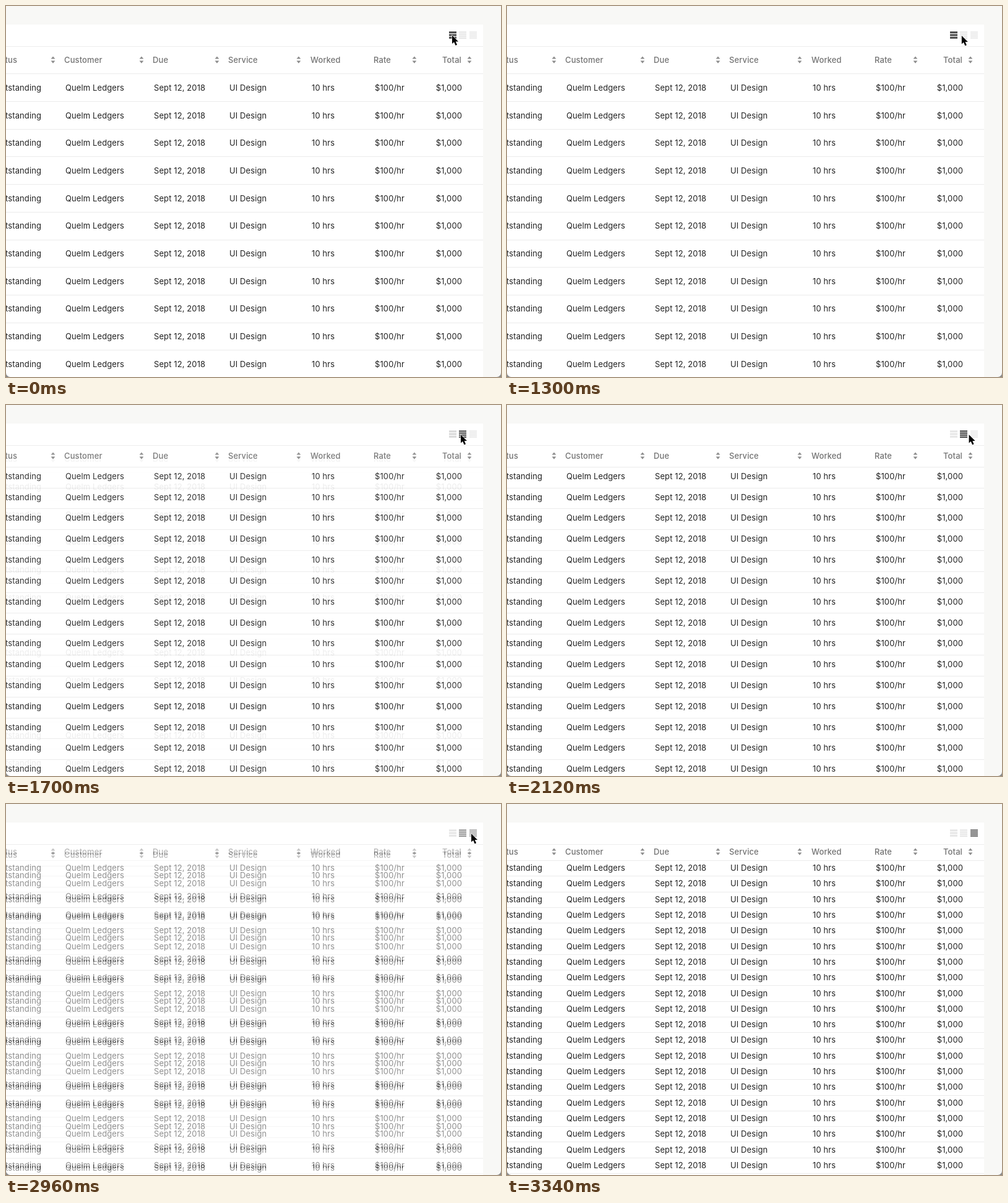
Recreate the animation shown at these times as an HTML page. Size 800 px wide and 600 px high, loop 3.6 s.

```html
<!DOCTYPE html>
<html lang="en">
<head>
<meta charset="utf-8">
<title>Table density</title>
<style>
  html, body { margin: 0; width: 100%; height: 100%; overflow: hidden; background: #f8f8f6; }
  svg { display: block; width: 800px; height: 600px; }
  text { font: 400 13px Inter, sans-serif; letter-spacing: .1px; fill: #222; }
  .head { font-weight: 500; fill: #737373; }
</style>
</head>
<body>
<svg id="stage" viewBox="0 0 800 600"></svg>
<script>
const LOOP = 3600;
const stage = document.getElementById('stage');

function add(parent, tag, attrs, label) {
  const el = document.createElementNS('http://www.w3.org/2000/svg', tag);
  for (const key in attrs) el.setAttribute(key, attrs[key]);
  if (label) el.textContent = label;
  parent.appendChild(el);
  return el;
}

const rect = (parent, x, y, width, height, fill) =>
  add(parent, 'rect', { x, y, width, height, fill });

// title, title x, cell, cell x, anchor, sort arrow x
const columns = [
  ['Status', 18, 'Outstanding', 57, 'end', 76],
  ['Customer', 94, 'Quelm Ledgers', 96, 'start', 219],
  ['Due', 237, 'Sept 12, 2018', 239, 'start', 341],
  ['Service', 359, 'UI Design', 361, 'start', 473],
  ['Worked', 492, '10 hrs', 494, 'start', 0],
  ['Rate', 594, '$100/hr', 596, 'start', 660],
  ['Total', 736, '$1,000', 737, 'end', 749]
];

// head: title centre, line: first rule, row: first cell centre, step: row height
const views = [
  { head: 87, line: 109.3, row: 131.8, step: 44.7 },
  { head: 82, line: 99.7, row: 114.8, step: 33.82 },
  { head: 77, line: 91, row: 103.1, step: 25.3 }
];

// x, bar count, bar height, bar pitch
const icons = [
  [716, 3, 3, 4.3],
  [732, 4, 2.2, 3.2],
  [749, 6, 1.2, 2.1]
];

function drawIcons(layer, active) {
  icons.forEach(([x, count, height, pitch], i) => {
    const fill = i === active ? '#484848' : '#e6e6e6';
    for (let k = 0; k < count; k++) rect(layer, x, 41.2 + k * pitch, 12, height, fill);
  });
}

function drawView(view, index) {
  const layer = add(stage, 'g', {});
  rect(layer, 0, 30, 771, 570, '#fff');
  rect(layer, 0, 65, 771, 1, '#ededed');
  drawIcons(layer, index);

  for (const [title, x, , , anchor, sort] of columns) {
    add(layer, 'text', { x, y: view.head + 5, 'text-anchor': anchor, class: 'head' }, title);
    if (sort) {
      add(layer, 'path', {
        d: `M${sort - 3.4} ${view.head - 1.4}h6.8l-3.4-4.2zm0 3h6.8l-3.4 4.2z`,
        fill: '#8c8c8c'
      });
    }
  }

  for (let k = 0; view.line + k * view.step < 600; k++) {
    rect(layer, 0, Math.round(view.line + k * view.step), 771, 1, '#ebebeb');
    const y = Math.round(view.row + k * view.step) + 5;
    for (const [, , cell, x, anchor] of columns) {
      add(layer, 'text', { x, y, 'text-anchor': anchor }, cell);
    }
  }
  return layer;
}

rect(stage, 0, 0, 800, 600, '#f8f8f6');
const layers = views.map(drawView);
add(stage, 'path', { d: 'M0 593v7h7a7 7 0 0 1-7-7zM800 593v7h-7a7 7 0 0 0 7-7z', fill: '#8a8a8a' });
const cursor = add(stage, 'path', {
  d: 'M0 0V13.6L3.1 10.8L5.5 16.3L8 15.2L5.7 9.9H10Z',
  fill: '#000', stroke: '#fff', 'stroke-width': 1.1, 'paint-order': 'stroke'
});

function bezier(x1, y1, x2, y2) {
  const at = (a, b, u) => 3 * a * u * (1 - u) ** 2 + 3 * b * u * u * (1 - u) + u ** 3;
  return t => {
    if (t <= 0 || t >= 1) return t <= 0 ? 0 : 1;
    let lo = 0, hi = 1;
    for (let i = 0; i < 20; i++) {
      const mid = (lo + hi) / 2;
      if (at(x1, x2, mid) < t) lo = mid; else hi = mid;
    }
    return at(y1, y2, lo);
  };
}

const ease = bezier(.25, .1, .25, 1);
const easeInOut = bezier(.42, 0, .58, 1);

const fades = [
  { layer: 1, start: 1588, span: 170 },
  { layer: 2, start: 2890, span: 240 }
];

// start, end, x, y
const moves = [
  [0, 0, 721, 47.5],
  [800, 1340, 735, 48],
  [1920, 2180, 748, 48],
  [2380, 2720, 752, 48],
  [2980, 3340, 769, -20]
];

function render(t) {
  for (const { layer, start, span } of fades) {
    layers[layer].setAttribute('opacity', ease((t - start) / span));
  }
  let [, , x, y] = moves[0];
  for (const [start, end, toX, toY] of moves.slice(1)) {
    const p = easeInOut((t - start) / (end - start));
    x += (toX - x) * p;
    y += (toY - y) * p;
  }
  cursor.setAttribute('transform', `translate(${x} ${y})`);
}

const begin = performance.now();
function tick() {
  const t = (performance.now() - begin) % LOOP;
  render(Math.floor(t / 20) * 20);
  requestAnimationFrame(tick);
}
tick();
</script>
</body>
</html>
```
